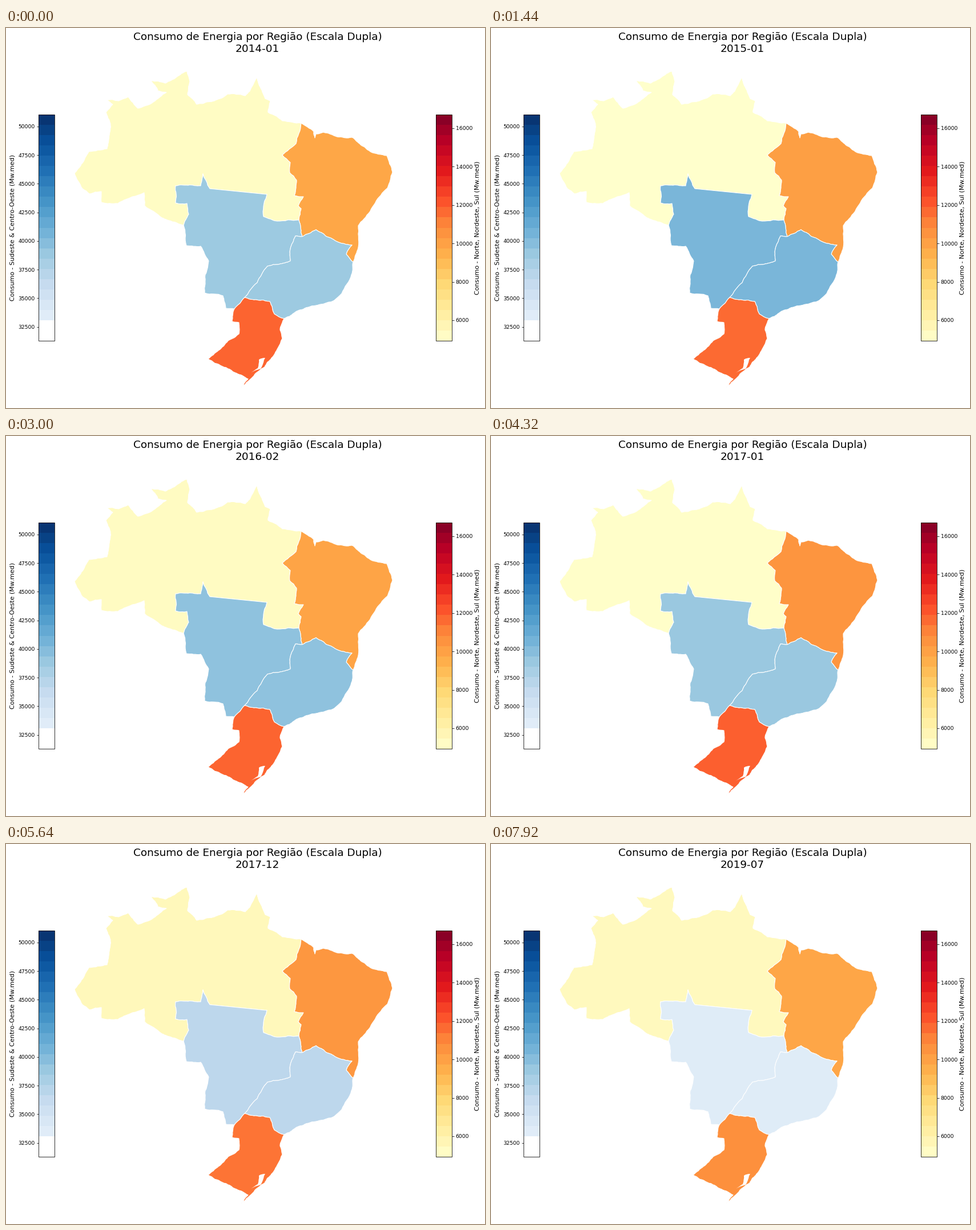
A matplotlib script for the animation above (8 s loop, 839 by 667 pixels).

```python
import math
import random

import numpy as np
import matplotlib.pyplot as plt
from matplotlib.animation import FuncAnimation
from matplotlib.patches import Polygon, Rectangle

W, H, DPI = 839, 667, 64
PT = 72 / DPI                     # points per pixel
MONTHS, HOLD, STEP = 67, 3, 40    # a month lasts three steps of 40 ms
FRAMES = 200

rng = random.Random(7)
plt.rcParams["font.family"] = "DejaVu Sans"


def split(a, b):
    """Midpoint displacement down to legs of a few pixels."""
    dx, dy = b[0] - a[0], b[1] - a[1]
    length = math.hypot(dx, dy)
    if length < 5:
        return [b]
    k = rng.uniform(-1, 1) * min(0.07, 1.3 / length)
    mid = ((a[0] + b[0]) / 2 - k * dy, (a[1] + b[1]) / 2 + k * dx)
    return split(a, mid) + split(mid, b)


def border(*keys):
    """Natural line through key points; long surveyed legs stay straight."""
    path = [keys[0]]
    for a, b in zip(keys, keys[1:]):
        path += split(a, b) if math.dist(a, b) < 75 else [b]
    return path


# Shared borders
north_center = border(
    (311, 346), (320, 327), (317, 308), (297, 307), (297, 277), (341, 277),
    (345, 256), (357, 282), (457, 292), (451, 313), (451, 331), (475, 339),
    (513, 337))
north_east = border(
    (513, 337), (517, 317), (512, 312), (521, 296), (505, 294), (509, 267),
    (497, 254), (498, 236), (484, 223), (508, 203), (517, 167))
east_southeast = border(
    (608, 411), (596, 397), (606, 381), (578, 374), (543, 354), (519, 366))
east_center = border((519, 366), (513, 337))
center_southeast = border(
    (519, 366), (507, 365), (498, 388), (498, 409), (458, 418), (440, 447),
    (418, 473))
south_southeast = border((418, 473), (462, 480), (470, 502), (487, 510))
south_center = border((400, 493), (418, 473))

# Outer outlines
amazon = border(
    (517, 167), (484, 163), (474, 155), (459, 148), (463, 128), (454, 124),
    (439, 87), (427, 111), (419, 119), (388, 116), (375, 124), (334, 134),
    (318, 117), (322, 94), (317, 76), (299, 86), (279, 97), (254, 92),
    (266, 110), (281, 113), (258, 130), (231, 141), (214, 121), (197, 128),
    (177, 126), (187, 134), (175, 148), (183, 168), (177, 212), (145, 217),
    (132, 239), (120, 255), (134, 282), (146, 291), (167, 287), (167, 306),
    (196, 308), (242, 289), (243, 312), (273, 333), (311, 346))
east_coast = border(
    (517, 167), (539, 182), (541, 193), (543, 186), (556, 183), (580, 191),
    (606, 192), (638, 217), (667, 224), (677, 253), (668, 281), (627, 335),
    (617, 347), (617, 385), (608, 411))
southeast_coast = border(
    (608, 411), (605, 433), (588, 466), (575, 478), (523, 492), (487, 510))
center_west = border(
    (311, 346), (316, 382), (341, 383), (355, 409), (349, 433), (348, 465),
    (380, 470), (385, 492), (400, 493))
south_coast = border(
    (487, 510), (480, 530), (484, 545), (476, 562), (453, 595), (411, 632),
    (424, 616), (404, 606), (354, 581), (389, 549), (408, 537), (408, 517),
    (396, 515), (400, 493))
lagoon = border((454, 579), (443, 582), (441, 597), (429, 605), (446, 598),
                (454, 579))

OUTLINES = {
    "N": amazon + north_center + north_east,
    "NE": east_coast + east_southeast + east_center + north_east,
    "CO": center_west + south_center + center_southeast[::-1] + east_center
          + north_center[::-1],
    "SE": southeast_coast + south_southeast[::-1] + center_southeast[::-1]
          + east_southeast[::-1],
    "S": south_coast + south_center + south_southeast,
}

warm, cool = plt.get_cmap("YlOrRd"), plt.get_cmap("Blues")
KEYS = [0, 12, 25, 36, 47, 58, 66]


def series(levels, swing, peak):
    """Colour-scale position per month: yearly wave plus drift through KEYS."""
    wave = swing * np.cos(2 * np.pi * (np.arange(MONTHS) - peak) / 12)
    drift = np.interp(range(MONTHS), KEYS, levels - wave[KEYS])
    return np.clip(drift + wave, 0, 1)


north = warm(series([.025, 0, .028, .008, .048, .034, .042], .015, 9))
east = warm(series([.412, .439, .422, .473, .466, .497, .415], .035, 0))
south = warm(series([.581, .569, .579, .593, .548, .542, .490], .06, 1))
center = cool(series([.377, .463, .414, .385, .278, .278, .120], .10, 1))
colors = {"N": north, "NE": east, "S": south, "SE": center, "CO": center}

fig = plt.figure(figsize=(W / DPI, H / DPI), dpi=DPI, facecolor="white")
ax = fig.add_axes([0, 0, 1, 1])
ax.set_xlim(0, W)
ax.set_ylim(H, 0)
ax.axis("off")

TOP, BOTTOM, BAR_W, BANDS = 152, 549, 28, 22


def colorbar(x, cmap, ticks, y_first, y_last, side, label, label_x):
    step = (BOTTOM - TOP) / BANDS
    for i in range(BANDS):
        color = cmap((i + 0.5) / BANDS)
        if min(color) > 0.9:      # the palest tints show as white
            color = "white"
        ax.add_patch(Rectangle((x, BOTTOM - i * step), BAR_W, -step, fc=color,
                               lw=0, antialiased=False))
    ax.add_patch(Rectangle((x, TOP), BAR_W, BOTTOM - TOP, fill=False,
                           ec="black", lw=0.8 * PT))
    edge = x + BAR_W if side > 0 else x
    for value, y in zip(ticks, np.linspace(y_first, y_last, len(ticks))):
        ax.plot([edge, edge + 3.3 * side], [y, y], color="black",
                lw=0.75 * PT, solid_capstyle="butt")
        ax.text(edge + 6.4 * side, y, str(value), size=9.24 * PT,
                ha="left" if side > 0 else "right", va="center_baseline")
    ax.text(label_x, (TOP + BOTTOM) / 2, label, size=11.09 * PT, rotation=90,
            ha="center", va="center")


colorbar(57.4, cool, range(32500, 50001, 2500), 524.5, 173, -1,
         "Consumo - Sudeste & Centro-Oeste (Mw.med)", 11.5)
colorbar(753.4, warm, range(6000, 16001, 2000), 513, 175.7, 1,
         "Consumo - Norte, Nordeste, Sul (Mw.med)", 825.5)

regions = {}
for name, outline in OUTLINES.items():
    regions[name] = ax.add_patch(Polygon(outline, closed=True, ec="white",
                                         lw=1.1 * PT, joinstyle="round"))
ax.add_patch(Polygon(lagoon, closed=True, fc="white", lw=0))

title = dict(size=18.48 * PT, ha="center", va="baseline")
ax.text(440.5, 21, "Consumo de Energia por Região (Escala Dupla)", **title)
date = ax.text(440.5, 42, "", **title)


def update(i):
    month = i // HOLD
    date.set_text(f"{2014 + month // 12}-{month % 12 + 1:02d}")
    for name, patch in regions.items():
        patch.set_facecolor(colors[name][month])
    return [date, *regions.values()]


anim = FuncAnimation(fig, update, frames=FRAMES, interval=STEP, repeat=True,
                     repeat_delay=0, init_func=lambda: update(0))
plt.show()
```
